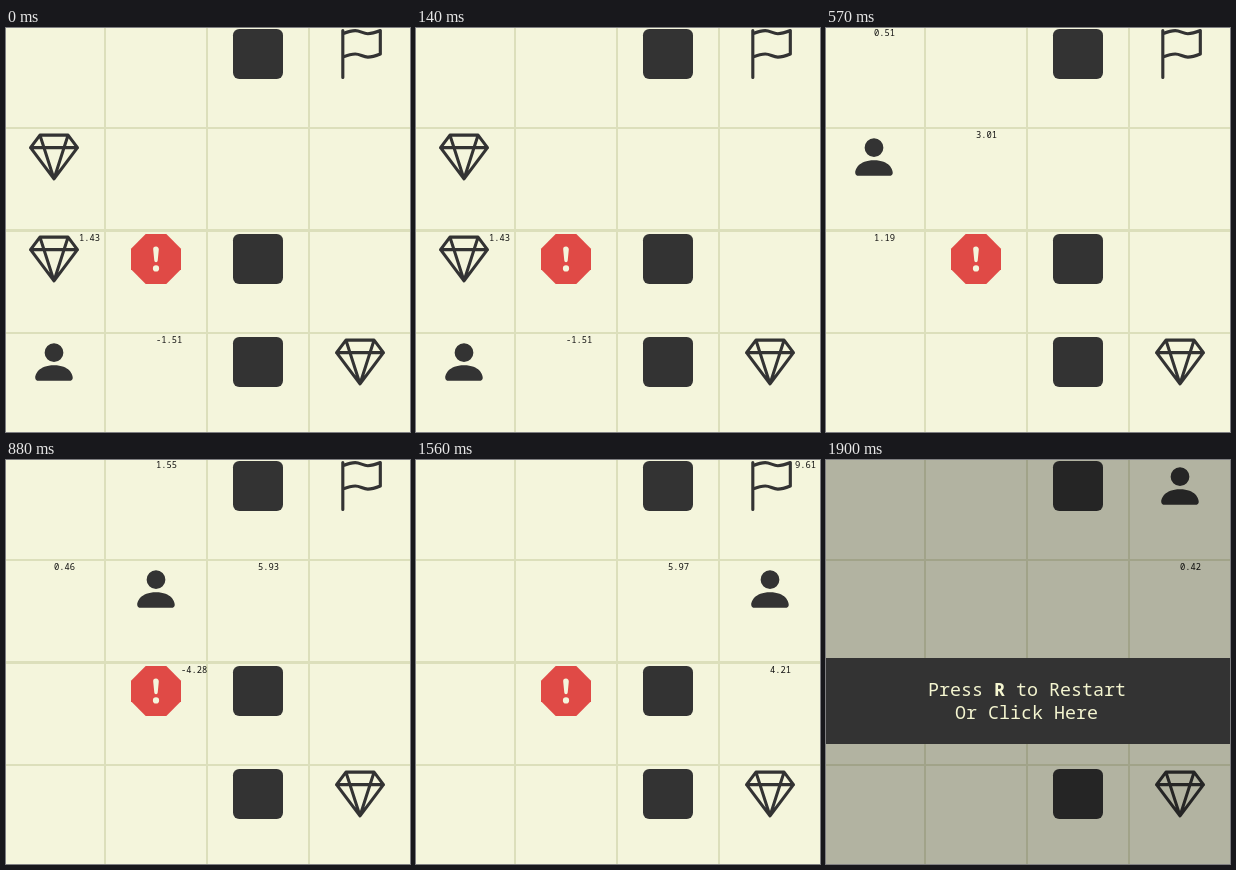
An HTML page with a canvas for the animation above (2240 ms loop, 404 by 404 pixels).

```html
<!DOCTYPE html>
<html lang="en">
<head>
<meta charset="utf-8">
<title>Grid walk</title>
<style>
  html, body { margin: 0; width: 100%; height: 100%; overflow: hidden; background: #f4f5dc; }
  canvas { display: block; width: 404px; height: 404px; }
</style>
</head>
<body>
<canvas id="stage"></canvas>
<script>
const SIZE = 404, LOOP = 2240;
const PAPER = '#f4f5dc', LINE = '#dcdfbb', INK = '#333', RED = '#e04a46';
const MONO = '"Noto Sans Mono", "DejaVu Sans Mono", monospace';
const ROWS = [1, 104, 206, 309];
const BASELINES = [8, 110, 213, 315];
const colX = c => 23 + 102 * c;

const canvas = document.getElementById('stage');
const ctx = canvas.getContext('2d');
const dpr = window.devicePixelRatio || 1;
canvas.width = canvas.height = Math.round(SIZE * dpr);

// Icons live in a 16 x 16 box
const gem = new Path2D('M3.5 1h9l3 4L8 15 .5 5zM.5 5h15M3.5 1 8 15l4.5-14');
const flag = new Path2D('M2.5 15.5V.5M2.5 1.5S5 .5 6.5 .5 9 1.5 10.5 1.5 14.5 .5 14.5 .5V8S12 9 10.5 9 8 8 6.5 8 2.5 9 2.5 9');
const person = new Path2D('M3 14s-1 0-1-1 1-4 6-4 6 3 6 4-1 1-1 1zM8 8a3 3 0 1 0 0-6 3 3 0 0 0 0 6z');
const block = new Path2D('M0 2a2 2 0 0 1 2-2h12a2 2 0 0 1 2 2v12a2 2 0 0 1-2 2H2a2 2 0 0 1-2-2z');
const octagon = new Path2D('M4.7 0h6.6L16 4.7v6.6L11.3 16H4.7L0 11.3V4.7z');
const bang = new Path2D('M8 4c.535 0 .954.462.9.995l-.35 3.507a.552.552 0 0 1-1.1 0L7.1 4.995A.905.905 0 0 1 8 4zM8 10a1 1 0 1 1 0 2 1 1 0 0 1 0-2z');

// Each step: start time, player cell, scores as [col, row, text]
const STEPS = [
  { at: 0,    me: [0, 3], scores: [[0, 2, '1.43'], [1, 3, '-1.51']] },
  { at: 230,  me: [0, 2], scores: [[0, 1, '1.37'], [1, 2, '-7.15'], [0, 3, '-0.21']] },
  { at: 570,  me: [0, 1], scores: [[0, 0, '0.51'], [1, 1, '3.01'], [0, 2, '1.19']] },
  { at: 880,  me: [1, 1], scores: [[1, 0, '1.55'], [0, 1, '0.46'], [2, 1, '5.93'], [1, 2, '-4.28']] },
  { at: 1220, me: [2, 1], scores: [[1, 1, '3.69'], [3, 1, '7.65']] },
  { at: 1560, me: [3, 1], scores: [[3, 0, '9.61'], [2, 1, '5.97'], [3, 2, '4.21']] },
  { at: 1900, me: [3, 0], scores: [[3, 1, '0.42']], over: true }
];

function icon(c, r, draw) {
  ctx.save();
  ctx.translate(colX(c), ROWS[r]);
  ctx.scale(3.125, 3.125);
  draw();
  ctx.restore();
}

function fill(path, color = INK) {
  ctx.fillStyle = color;
  ctx.fill(path);
}

function stroke(path) {
  ctx.strokeStyle = INK;
  ctx.lineWidth = 1;
  ctx.lineCap = ctx.lineJoin = 'round';
  ctx.stroke(path);
}

function drawGrid() {
  ctx.fillStyle = PAPER;
  ctx.fillRect(0, 0, SIZE, SIZE);
  ctx.fillStyle = LINE;
  for (const x of [98, 200, 302]) ctx.fillRect(x, 0, 2, SIZE);
  for (const [y, h] of [[99, 2], [201, 3], [304, 2]]) ctx.fillRect(0, y, SIZE, h);
}

function text(str, x, y, size, color, weight = 400) {
  ctx.font = `${weight} ${size}px ${MONO}`;
  ctx.fillStyle = color;
  ctx.fillText(str, x, y);
  return x + ctx.measureText(str).width;
}

function drawBanner() {
  ctx.fillStyle = 'rgba(0, 0, 0, 0.27)';
  ctx.fillRect(0, 0, SIZE, SIZE);
  ctx.fillStyle = INK;
  ctx.fillRect(0, 198, SIZE, 86);
  const size = 18.33, color = '#f4f5d0';
  let x = text('Press ', 102, 236, size, color);
  x = text('R', x, 236, size, color, 700);
  text(' to Restart', x, 236, size, color);
  text('Or Click Here', 129, 259, size, color);
}

function render(t) {
  const i = STEPS.findLastIndex(s => s.at <= t);
  const step = STEPS[i];
  const [mc, mr] = step.me;
  ctx.setTransform(dpr, 0, 0, dpr, 0, 0);
  drawGrid();

  for (const r of [0, 2, 3]) icon(2, r, () => fill(block));
  icon(1, 2, () => { fill(octagon, RED); fill(bang, PAPER); });

  // Gems vanish once reached
  const gems = [[3, 3]];
  if (i < 1) gems.push([0, 2]);
  if (i < 2) gems.push([0, 1]);
  for (const [c, r] of gems) icon(c, r, () => stroke(gem));
  if (!step.over) icon(3, 0, () => stroke(flag));
  icon(mc, mr, () => fill(person));

  // Scores sit beside an icon, or start at the middle of an empty cell
  const taken = [...gems, [1, 2], [3, 0]];
  for (const [c, r, label] of step.scores) {
    const beside = taken.some(([gc, gr]) => gc === c && gr === r);
    text(label, colX(c) + (beside ? 50 : 25), BASELINES[r], 8.8, '#111', 500);
  }
  if (step.over) drawBanner();
}

const start = performance.now();
function tick() {
  render((performance.now() - start) % LOOP);
  requestAnimationFrame(tick);
}
tick();
</script>
</body>
</html>
```
